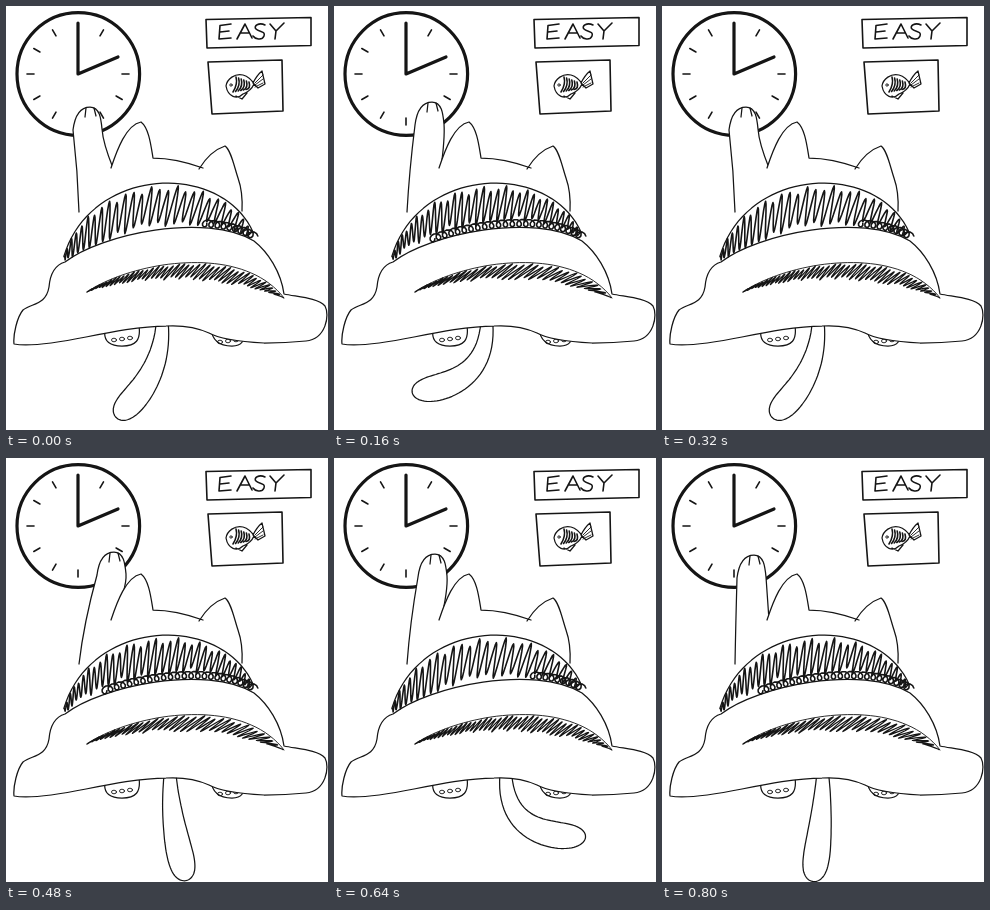
Recreate the animation shown at these times as an HTML page. Size 322 px wide and 424 px high, loop 0.96 s.

```html
<!DOCTYPE html>
<html lang="en">
<head>
<meta charset="utf-8">
<title>Cat in a hat reaching for the clock</title>
<style>
  html, body { margin: 0; width: 100%; height: 100%; overflow: hidden; background: #fff; }
  svg { display: block; width: 322px; height: 424px; }
  path, circle, ellipse { fill: none; stroke: #151515; stroke-width: 1.25; stroke-linecap: round; stroke-linejoin: round; }
  .solid { fill: #fff; }
  .blank { fill: #fff; stroke: none; }
  .bold { stroke-width: 3.2; }
  .mid { stroke-width: 1.6; }
  .fine { stroke-width: .9; }
</style>
</head>
<body>
<svg viewBox="0 0 322 424" role="img" aria-label="EASY">
  <g id="clock">
    <circle class="bold" cx="72.3" cy="68" r="61.3"/>
    <path class="bold" d="M72 17V68L112 51"/>
  </g>

  <g id="sign" class="mid">
    <path class="mid" d="M200 13.5L305 11.5V39.5L201 42Z"/>
    <path class="mid" d="M225 18L214 19.5L213 33L225 32M214 26L223 25M231 33L239 18L246 32M234 27H243
      M259 19C253 16 247 20 250 23S260 25 258 30S249 33 247 30M264 18L270 25L278 17M270 25L269 33"/>
  </g>

  <g id="fish">
    <path class="mid" d="M202 56L276 54L277 105L206 108Z"/>
    <path d="M220 80C221 73 229 67 237 69Q244 71 248 78Q245 85 237 88C231 94 222 91 220 80ZM247 77Q251 69 256 65L259 78L252 82ZM230 90L236 93L241 87"/>
    <circle class="fine" cx="225" cy="79" r="1.2"/>
  </g>

  <g id="tails"></g>
  <g id="feet">
    <path class="solid" d="M99 324C97 336 105 340 116 340C130 340 135 334 133 320"/>
    <path class="solid" d="M205 322C206 336 215 340 226 340C236 340 239 335 237 325"/>
  </g>
  <g id="arms"></g>

  <path class="blank" d="M105 162C111 144 120 119 135 116C143 122 145 140 147 152Q170 152 195 162C201 150 210 143 219 140Q230 155 236 205H105Z"/>
  <path d="M105 162C111 144 120 119 135 116C143 122 145 140 147 152Q170 152 197 162M193 163C201 150 210 143 219 140C225 144 228 160 232 172Q237 186 236 205"/>

  <path class="blank" d="M58 250C85 160 215 155 247 226V250H58Z"/>
  <path class="solid" d="M59 256C49 259 44 269 43 281C40 299 26 297 17 304C11 311 7 329 8 338C24 341 55 336 80 331C105 326 135 320 160 320C178 319 190 321 203 327C215 334 240 336 258 337Q280 337 300 335C320 333 324 309 319 300C312 292 292 291 278 288C275 266 262 246 248 235C200 206 95 228 59 256Z"/>
  <g id="bands"></g>
</svg>

<script>
const STEP = 160, STEPS = 6, TURN = Math.PI * 2;
const byId = id => document.getElementById(id);

function add(parent, tag, attrs = {}) {
  const el = document.createElementNS('http://www.w3.org/2000/svg', tag);
  for (const key in attrs) el.setAttribute(key, attrs[key]);
  return parent.appendChild(el);
}

// Shows an element on the listed steps only, with hard cuts.
function showOn(el, steps) {
  const frames = Array.from({ length: STEPS + 1 }, (_, i) => ({
    opacity: steps.includes(i % STEPS) ? 1 : 0, offset: i / STEPS, easing: 'steps(1, end)'
  }));
  el.animate(frames, { duration: STEP * STEPS, iterations: Infinity }).startTime = 0;
}

function randomizer(seed) {
  return () => (seed = (seed * 16807) % 2147483647) / 2147483647;
}

const mix = (a, b, k) => a.map((v, axis) => v + (b[axis] - v) * k);
const bezier = (points, u) => points.length === 1 ? points[0]
  : bezier(points.slice(1).map((p, i) => mix(points[i], p, u)), u);
const sample = (count, fn) => Array.from({ length: count + 1 }, (_, i) => fn(i / count));
const toPath = points => 'M' + points.map(p => p.map(v => v.toFixed(1)).join(' ')).join('L');

// One continuous rounded scribble between two edges.
function hatch(top, bottom, { strokes, lean, depth, seed }) {
  const rand = randomizer(seed);
  const reach = sample(strokes, () => depth * (.85 + .2 * rand()));
  return toPath(sample(strokes * 12, u => {
    const phase = u * strokes, down = (1 - Math.cos(phase * TURN)) / 2;
    const inset = .12 + .07 * Math.sin(u * 61);
    const low = bezier(bottom, Math.max(0, u - lean));
    return mix(bezier(top, u), low, inset + (reach[Math.floor(phase)] - inset) * down);
  }));
}

function loops(edge, from, count) {
  return toPath(sample(count * 10, u => {
    const [x, y] = bezier(edge, from + (1 - from) * u), a = u * count * TURN;
    return [x + Math.cos(a) * 3.8, y - 4 + Math.sin(a) * 3.6];
  }));
}

function drawArm(parent, [x, y]) {
  add(parent, 'path', { class: 'solid', d:
    `M73 206Q${72 + (x - 85) / 4} 165 ${x - 17} ${y + 23}C${x - 15} ${y + 7} ${x - 9} ${y} ${x} ${y}
     C${x + 10} ${y} ${x + 11} ${y + 12} ${x + 12} ${y + 22}Q${x + 13} ${y + 36} 107 162` });
  add(parent, 'path', { d: `M${x - 4} ${y + 1}l-1 9M${x + 4} ${y + 1}l2 8` });
}

// A tapered club along a spine that hangs down, then bends to the swing angle.
function drawTail(parent, swing) {
  const a = swing * TURN / 360, tip = [162 + 108 * Math.sin(a), 320 + 104 * Math.cos(a)];
  const rootX = 162 + (tip[0] - 162) * .11;
  const spine = [[rootX, 317], [rootX, 360 + .4 * Math.abs(swing)], tip];
  const edge = side => sample(40, t => {
    const u = 1 - (1 - t) ** 2;
    const [x, y] = bezier(spine, u), [nx, ny] = bezier(spine, u + .01);
    const len = Math.hypot(nx - x, ny - y);
    const width = side * (6 + 10 * u) * Math.sqrt(Math.max(0, 1 - u ** 9));
    return [x - (ny - y) / len * width, y + (nx - x) / len * width];
  });
  add(parent, 'path', { class: 'solid', d: toPath([...edge(1), ...edge(-1).reverse()]) });
}

for (let hour = 3; hour <= 13; hour++) {
  add(byId('clock'), 'path', { class: 'mid', d: 'M72 17V24', transform: `rotate(${hour * 30} 72 68)` });
}

for (let i = 0; i < 6; i++) {
  add(byId('fish'), 'path', { class: 'mid', d: `M${230 + i * 2.6} ${71 + i}q2 7 -3 ${15 - i * 1.5}` });
  if (i % 2) add(byId('fish'), 'path', { class: 'fine', d: `M249 ${76 + i}L257 ${67 + i * 2}` });
}

for (const [x, y] of [[116, 333], [222, 335]]) {
  for (const dx of [-8, 0, 8]) {
    add(byId('feet'), 'ellipse', { class: 'fine', cx: x + dx, cy: y - dx / 8, rx: 2.5, ry: 1.8 });
  }
}

const poses = [
  { steps: [0, 2], paw: [84, 101], swing: -29 },
  { steps: [1], paw: [98, 96], swing: -51 },
  { steps: [3], paw: [108, 94], swing: 10 },
  { steps: [4], paw: [101, 96], swing: 56 },
  { steps: [5], paw: [92, 97], swing: -6 }
];

for (const { steps, paw, swing } of poses) {
  const arm = add(byId('arms'), 'g'), tail = add(byId('tails'), 'g');
  drawArm(arm, paw);
  drawTail(tail, swing);
  showOn(arm, steps);
  showOn(tail, steps);
}

const band = { top: [[58, 250], [85, 160], [215, 155], [247, 226]], bottom: [[59, 256], [95, 228], [200, 206], [248, 234]] };
const brim = { top: [[81, 286], [125, 256], [235, 236], [278, 292]], bottom: [[81, 286], [130, 268], [220, 268], [278, 292]] };

for (const edge of [band.top, brim.top]) {
  add(byId('bands'), 'path', { class: edge === brim.top ? 'fine' : '', d: toPath(sample(40, u => bezier(edge, u))) });
}

const scribbles = [
  { steps: [0, 2, 4], loopFrom: .72, loopCount: 9,
    crown: { strokes: 27, lean: .03, depth: .95, seed: 41 },
    rim: { strokes: 44, lean: .05, depth: 1, seed: 19 } },
  { steps: [1, 3, 5], loopFrom: .25, loopCount: 24,
    crown: { strokes: 32, lean: .02, depth: .85, seed: 83 },
    rim: { strokes: 34, lean: .08, depth: 1, seed: 57 } }
];

for (const { steps, loopFrom, loopCount, crown, rim } of scribbles) {
  const group = add(byId('bands'), 'g');
  add(group, 'path', { class: 'mid', d: hatch(band.top, band.bottom, crown) });
  add(group, 'path', { class: 'mid', d: loops(band.bottom, loopFrom, loopCount) });
  add(group, 'path', { d: hatch(brim.top, brim.bottom, rim) });
  showOn(group, steps);
}
</script>
</body>
</html>
```
